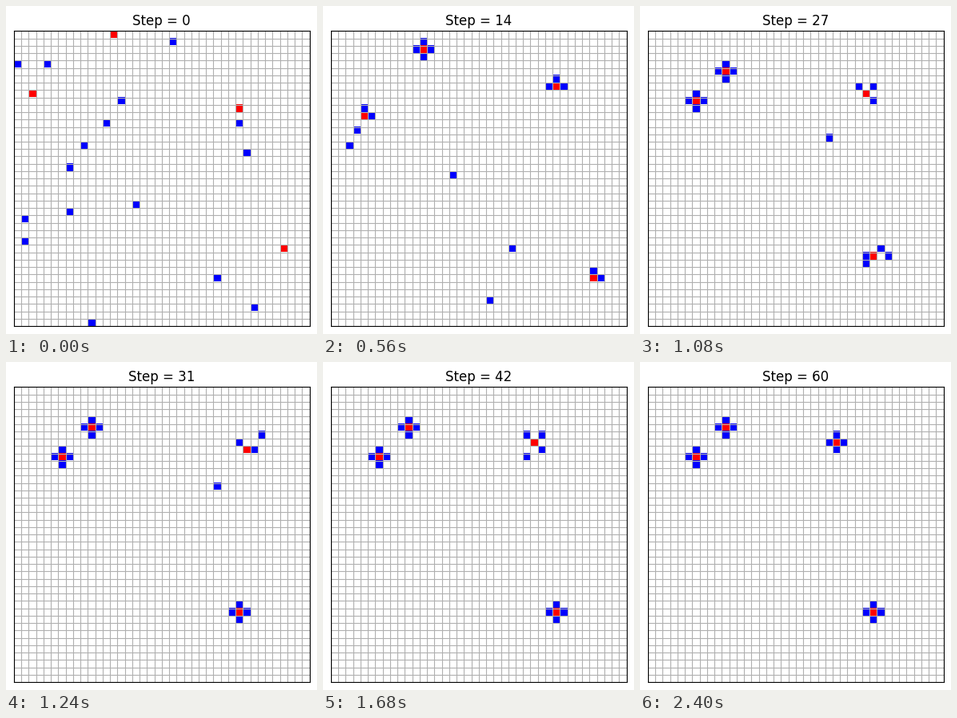
A matplotlib script for the animation above (2440 ms loop, 389x411 px).

```python
import random

import matplotlib.pyplot as plt
import numpy as np
from matplotlib.animation import FuncAnimation

W, H, DPI = 389, 411, 100
SIDE, MARGIN = 369.6, 10
N, STEPS, INTERVAL = 40, 61, 40
WHITE, BLUE, RED = (255, 255, 255), (0, 0, 255), (255, 0, 0)

SIDES = [(0, -1), (-1, 0), (1, 0), (0, 1)]          # up, left, right, down
CORNERS = [(x - y, x + y) for x, y in SIDES]        # the sides turned by 45 degrees
BEATS = [(14, SIDES), (22, CORNERS), (27, CORNERS),
         (35, SIDES), (42, CORNERS), (50, SIDES)]
ROAM = 2  # how far an animal strays from its goal while waiting

rng = random.Random(4)


def gap(a, b):
    return abs(a[0] - b[0]) + abs(a[1] - b[1])


def approach(cell, goal):
    """One cell along x or y, likelier along the longer way."""
    dx, dy = goal[0] - cell[0], goal[1] - cell[1]
    if rng.random() * gap(cell, goal) < abs(dx):
        return cell[0] + int(np.sign(dx)), cell[1]
    return cell[0], cell[1] + int(np.sign(dy))


def roam(cell, goal, reach, taken):
    """A random free neighbour that is close enough to the goal."""
    around = [(cell[0] + dx, cell[1] + dy) for dx, dy in SIDES]
    free = [c for c in around
            if gap(c, goal) <= reach and c not in taken and min(c) >= 0 and max(c) < N]
    return rng.choice(free) if free else cell


def advance(cell, goal, left, taken):
    dist = gap(cell, goal)
    if dist > ROAM or dist >= left:
        return approach(cell, goal)
    return roam(cell, goal, min(ROAM, left - 1), taken)


def hunt(prey, hunters):
    """All cells at every step; hunters close in on each stop of the prey."""
    cells = [prey[0], *hunters]
    history = [list(cells)]
    stops = prey[1:]
    for step in range(STEPS - 1):
        passed = sum(step >= end for end, _ in BEATS)
        leg = min(passed, len(stops) - 1)
        end, stance = BEATS[leg]
        if leg == len(stops) - 1:
            stance = SIDES
        px, py = stops[leg]
        goals = [(px, py)] + [(px + dx, py + dy) for dx, dy in stance]
        for i, goal in enumerate(goals):
            others = cells[:i] + cells[i + 1:]
            cells[i] = advance(cells[i], goal, end - step, others)
        history.append(list(cells))
    return history


hunts = [
    hunt([(13, 0), (12, 2), (10, 3), (10, 5)],
         [(14, 9), (4, 4), (12, 12), (0, 4)]),
    hunt([(2, 8), (4, 11), (7, 11), (6, 9)],
         [(9, 15), (1, 25), (7, 18), (1, 28)]),
    hunt([(30, 10), (30, 7), (28, 8), (29, 8), (31, 7), (27, 7), (25, 7)],
         [(30, 12), (21, 1), (31, 16), (7, 24)]),
    hunt([(36, 29), (35, 33), (33, 32), (30, 30)],
         [(32, 37), (16, 23), (27, 33), (10, 39)]),
]


def board(step):
    grid = np.full((N, N, 3), WHITE, dtype=np.uint8)
    for history in hunts:
        prey, *hunters = history[step]
        for x, y in hunters:
            grid[y, x] = BLUE
        grid[prey[1], prey[0]] = RED
    return grid


# The tiny surplus keeps the pixel size from being truncated.
fig = plt.figure(figsize=((W + 1e-6) / DPI, (H + 1e-6) / DPI), dpi=DPI,
                 facecolor="white")
ax = fig.add_axes([MARGIN / W, MARGIN / H, SIDE / W, SIDE / H])
image = ax.imshow(board(0), extent=(0, N, N, 0), aspect="auto",
                  interpolation="nearest")
ax.set_xticks(range(N + 1))
ax.set_yticks(range(N + 1))
ax.tick_params(length=0, labelbottom=False, labelleft=False)
ax.grid(color="#b0b0b0", linewidth=0.8)
title = ax.set_title("Step = 0", fontsize=12, family="DejaVu Sans", pad=5.3)


def draw(step):
    image.set_data(board(step))
    title.set_text(f"Step = {step}")
    return image, title


anim = FuncAnimation(fig, draw, frames=STEPS, interval=INTERVAL,
                     repeat=True, repeat_delay=0, blit=False)
plt.show()
```
